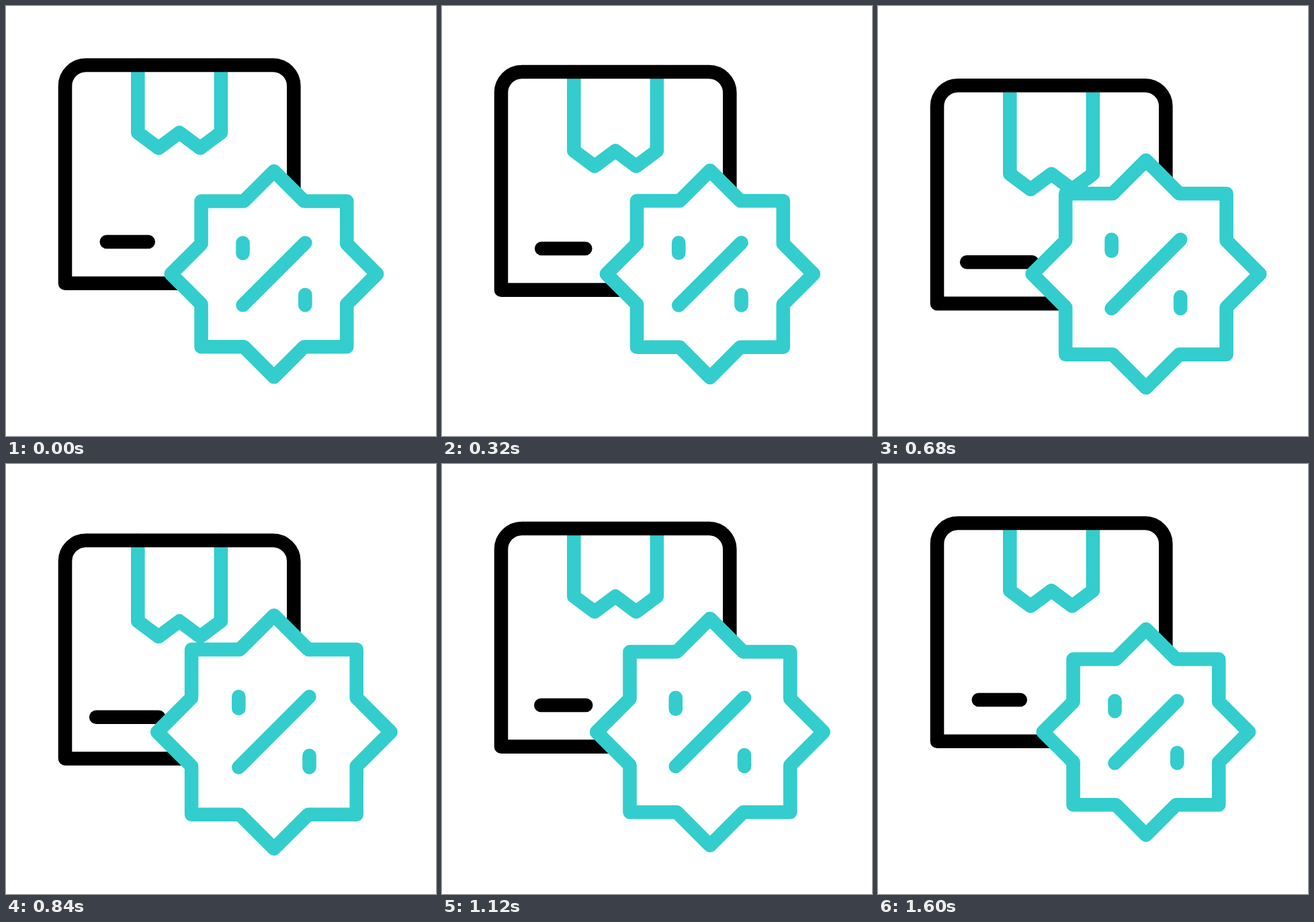
Animation of 640x640 px, one loop 1720 ms. Source, as an HTML page:

```html
<!DOCTYPE html>
<html lang="en">
<head>
<meta charset="utf-8">
<title>Parcel discount</title>
<style>
  html, body { margin: 0; width: 100%; height: 100%; overflow: hidden; background: #fff; }
  svg { display: block; width: 100%; height: 100%; }
  path { fill: none; stroke-width: 20.6; stroke-linecap: round; stroke-linejoin: round; }
  .dark { stroke: #000; }
  .teal { stroke: #33cdcd; }
  #badge path { vector-effect: non-scaling-stroke; }
  #star { fill: #fff; }
</style>
</head>
<body>
<svg viewBox="0 0 640 640">
  <g id="box">
    <path id="tape" class="teal"/>
    <path class="dark" d="M88 412.7V118.9A30.9 30.9 0 0 1 118.9 88H397.4A30.9 30.9 0 0 1 428.3 118.9V412.7Z"/>
    <path id="dash" class="dark"/>
  </g>
  <g id="badge">
    <path id="star" class="teal"/>
    <path class="teal" d="M-46.4 46.4L46.4 -46.4M-46.4 -46.4V-31M46.4 31V46.4"/>
  </g>
</svg>
<script>
const LOOP = 1720, STEP = 40, RADIUS = 153.2;
const $ = id => document.getElementById(id);
const box = $('box'), tape = $('tape'), dash = $('dash'), badge = $('badge');

// Outline of two overlapping squares
function starPath() {
  const side = RADIUS / Math.SQRT2, notch = RADIUS - side;
  const pts = [];
  for (let i = 0; i < 4; i++) {
    const c = [1, 0, -1, 0][i], s = [0, 1, 0, -1][i];
    for (const [x, y] of [[RADIUS, 0], [side, notch], [side, side], [notch, side]]) {
      pts.push((x * c - y * s).toFixed(2) + ' ' + (x * s + y * c).toFixed(2));
    }
  }
  return 'M' + pts.join('L') + 'Z';
}

// Cubic easing curve with horizontal tangents at both ends
function ease(x, x1 = 1 / 3, x2 = 2 / 3) {
  if (x <= 0) return 0;
  if (x >= 1) return 1;
  let lo = 0, hi = 1;
  for (let i = 0; i < 24; i++) {
    const u = (lo + hi) / 2, v = 1 - u;
    if (3 * u * v * v * x1 + 3 * u * u * v * x2 + u * u * u < x) lo = u;
    else hi = u;
  }
  return lo * lo * (3 - 2 * lo);
}

// Rises from a to b, falls from c to d
function swell(t, a, b, c, d, x1, x2) {
  return ease((t - a) / (b - a)) - ease((t - c) / (d - c), x1, x2);
}

function draw(t) {
  const drop = 30.2 * swell(t, 95, 680, 680, 1343);
  const pull = 34 * swell(t, 60, 580, 580, 1160);
  const grow = 18 * swell(t, 231, 721, 721, 1241);
  const reach = 20.6 * swell(t, 245, 868, 940, 1600, 0.33, 0.45);

  const high = 188.5 + pull, low = 211.5 + pull;
  box.setAttribute('transform', `translate(0 ${drop})`);
  tape.setAttribute('d', `M196.3 88V${high}L227.1 ${low}L258.1 ${high}L289 ${low}L319.9 ${high}V88`);
  dash.setAttribute('d', `M${149.8 - grow} 351H${211.7 + grow}`);
  badge.setAttribute('transform', `translate(398.9 398.9) scale(${1 + reach / RADIUS})`);
}

$('star').setAttribute('d', starPath());
const start = performance.now();
function tick() {
  const t = (performance.now() - start) % LOOP;
  draw(Math.floor(t / STEP) * STEP);
  requestAnimationFrame(tick);
}
tick();
</script>
</body>
</html>
```
